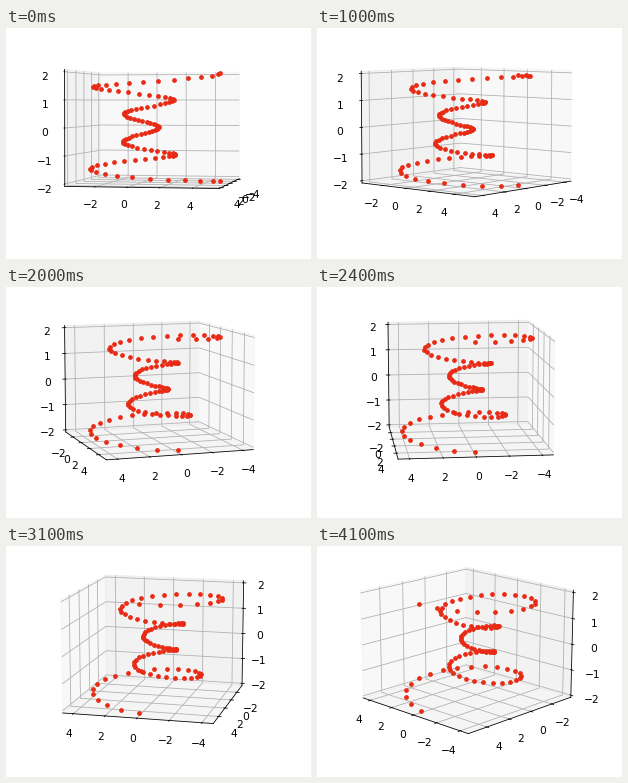
Recreate the animation shown at these times as a matplotlib script. Size 305 px wide and 231 px high, loop 4.2 s.

```python
import numpy as np
import matplotlib.pyplot as plt
from matplotlib.animation import FuncAnimation

W, H, DPI = 305, 231, 72
FRAMES, INTERVAL = 42, 100
SIDE = 231                # side of the square 3D viewport in pixels
CENTER = (150.1, 132.3)   # pixel position of the cube's centre, from bottom left
VIEW = (-0.095, 0.09)     # viewport limits in projected units
AZIM = (11, 134.4)        # camera angles, first and last
ELEV = (1.2, 16.2)
RED = "#e82a14"

plt.rcParams.update({"font.family": "DejaVu Sans", "font.size": 10.6})


def limits(values, margin):
    """Data range widened by a margin, plus the thin gap before the panes."""
    lo, hi = values.min(), values.max()
    half = (hi - lo) / 2 * (1 + 2 * margin) * 25 / 24
    mid = (lo + hi) / 2
    return mid - half, mid + half


theta = np.linspace(-4 * np.pi, 4 * np.pi, 100)
z = np.linspace(-2, 2, 100)
r = z**2 + 1
x = r * np.sin(theta)
y = r * np.cos(theta)

fig = plt.figure(figsize=(W / DPI, H / DPI), dpi=DPI, facecolor="white")
shift = -VIEW[0] / (VIEW[1] - VIEW[0]) * SIDE
ax = fig.add_axes(
    [(CENTER[0] - shift) / W, (CENTER[1] - shift) / H, SIDE / W, SIDE / H],
    projection="3d",
)
ax.patch.set_visible(False)
ax.plot(x, y, z, ".", color=RED, markersize=7.4)

ax.set_xlim(*limits(x, 0.05))
ax.set_ylim(*limits(y, 0.05))
ax.set_zlim(*limits(z, 0))
ax.set_xticks(range(-4, 5, 2))
ax.set_yticks(range(-2, 5, 2))
ax.set_zticks(range(-2, 3))
ax.tick_params(pad=4.2)
ax.viewLim.intervalx = VIEW
ax.viewLim.intervaly = VIEW


def update(i):
    t = i / (FRAMES - 1)
    ax.view_init(elev=ELEV[0] + t * (ELEV[1] - ELEV[0]),
                 azim=AZIM[0] + t * (AZIM[1] - AZIM[0]))
    return []


anim = FuncAnimation(fig, update, frames=FRAMES, interval=INTERVAL,
                     init_func=lambda: update(0), repeat=True, blit=False)
plt.show()
```
